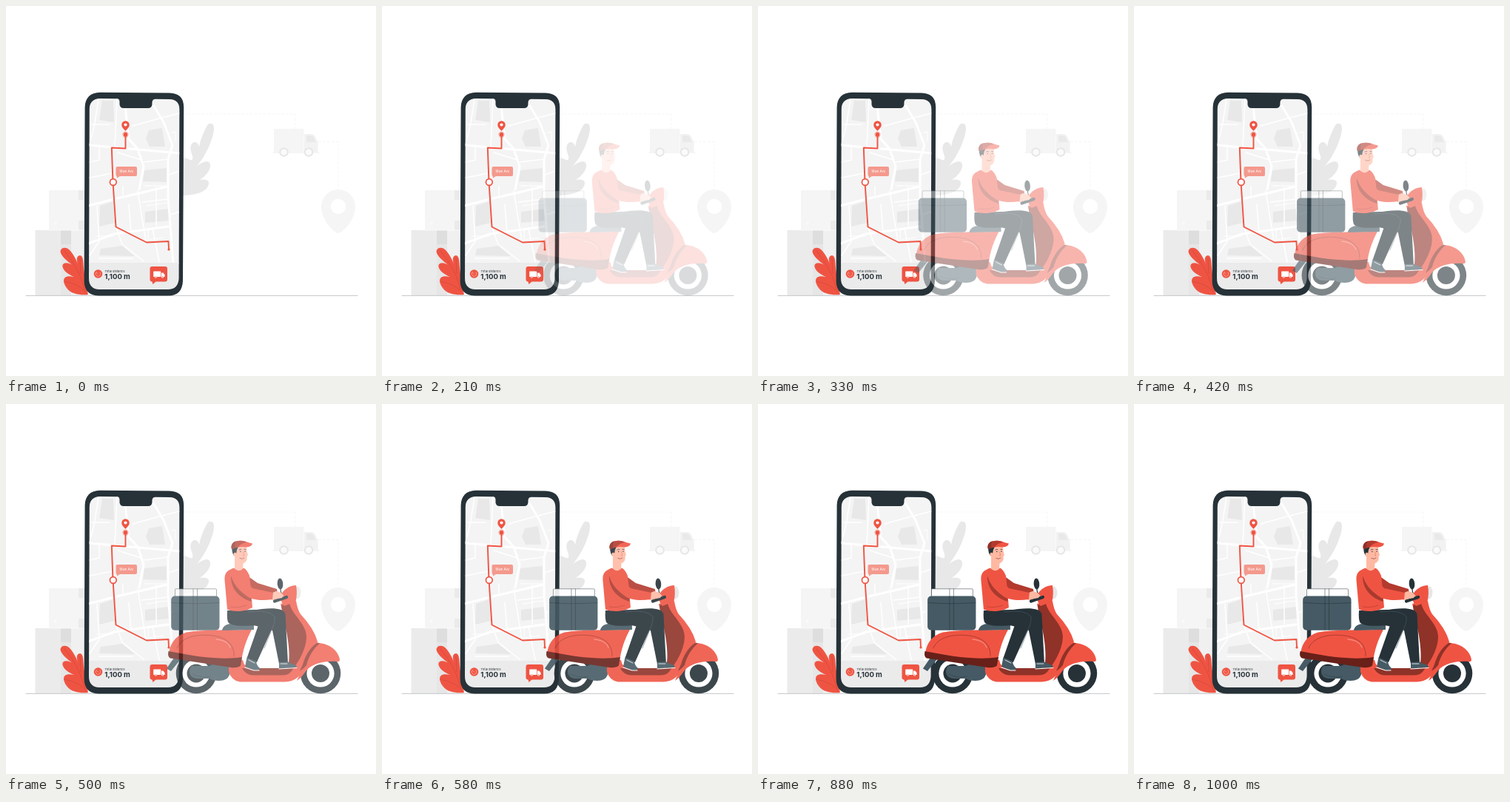
An HTML page with a canvas that plays this animation: 500 px wide and 500 px high, repeating every 1040 ms.

```html
<!DOCTYPE html>
<html lang="en">
<head>
<meta charset="utf-8">
<title>Delivery tracking</title>
<style>
html, body { margin: 0; width: 100%; height: 100%; overflow: hidden; background: #fff; }
canvas { display: block; width: 500px; height: 500px; }
</style>
</head>
<body>
<canvas id="stage"></canvas>
<script>
const SIZE = 500, LOOP = 1040, STEP = 41.6, TRAVEL = 20;
const RED = '#ef5443', DARK = '#263238', SLATE = '#455a64', MAROON = '#8f3228', SHADE = '#b23a2e', SKIN = '#ffb9a3';
const dpr = window.devicePixelRatio || 1;

function prepare(canvas) {
  canvas.width = canvas.height = SIZE * dpr;
  const c = canvas.getContext('2d');
  c.scale(dpr, dpr);
  c.lineCap = c.lineJoin = 'round';
  return c;
}
const stage = prepare(document.getElementById('stage'));
const backdrop = document.createElement('canvas');
const rider = document.createElement('canvas');
const backCtx = prepare(backdrop), rideCtx = prepare(rider);
let g = backCtx;

function fill(d, color) {
  g.fillStyle = color;
  g.fill(new Path2D(d));
}
function line(d, color, width) {
  g.strokeStyle = color;
  g.lineWidth = width;
  g.stroke(new Path2D(d));
}
function disc(x, y, r, color) {
  g.fillStyle = color;
  g.beginPath();
  g.arc(x, y, r, 0, Math.PI * 2);
  g.fill();
}
function oval(x, y, rx, ry, turn, color) {
  g.fillStyle = color;
  g.beginPath();
  g.ellipse(x, y, rx, ry, turn, 0, Math.PI * 2);
  g.fill();
}
function box(x, y, w, h, r, color) {
  g.fillStyle = color;
  g.beginPath();
  g.roundRect(x, y, w, h, r);
  g.fill();
}
function label(s, x, y, font, color) {
  g.font = font;
  g.fillStyle = color;
  g.fillText(s, x, y);
}
function pin(x, y, r, tip, hole, color) {
  const k = r * 0.75;
  fill(`M${x - r} ${y}A${r} ${r} 0 0 1 ${x + r} ${y}C${x + r} ${y + k} ${x + r * .35} ${tip - 2} ${x} ${tip}C${x - r * .35} ${tip - 2} ${x - r} ${y + k} ${x - r} ${y}Z`, color);
  disc(x, y, hole, '#fff');
}

function drawScenery() {
  // parcels
  box(58, 249, 50, 54, 0, '#f5f5f5');
  box(98, 249, 10, 13, 0, '#ebebeb');
  box(98, 290, 10, 13, 0, '#ebebeb');
  disc(67, 293.5, 2, '#fafafa');
  box(39.5, 303, 70, 88, 0, '#ebebeb');
  box(88, 303, 20, 88, 0, '#f0f0f0');
  box(74, 322, 14, 69, 0, '#e6e6e6');
  box(74, 303, 14, 19, 0, '#dedede');
  line('M58 303H106', '#fff', .6);

  // grey plant
  fill('M238 256C254 256 270 252 273 243C277 236 270 233 262 235C267 231 277 224 276 214C274 206 264 212 258 216C270 203 281 178 281 165C281 157 273 157 271 163C266 173 263 180 261 190C259 182 253 182 250 188C247 195 254 203 252 207C250 211 243 203 238 206Z', '#e8e8e8');

  // truck, pin and their dashed links
  g.setLineDash([3, 3]);
  line('M240 146H390.5V166M422 183.5H449V248', '#f3f3f3', .8);
  g.setLineDash([]);
  box(362, 166, 40.5, 31, 1, '#f5f5f5');
  fill('M403 173H413Q416 173 418 177L421.5 184V197H403Z', '#f2f2f2');
  fill('M406 175H412.5Q414.5 175 416 178L418.5 184H406Z', '#e9e9e9');
  line('M361 198H423', '#ebebeb', 1);
  for (const x of [375.5, 409]) {
    disc(x, 197.5, 6.2, '#e6e6e6');
    disc(x, 197.5, 4.3, '#fafafa');
  }
  pin(449, 271, 23, 307, 10.2, '#f5f5f5');

  line('M27 391.4H475', '#9aa1a4', .6);

  // red plant
  fill('M111 390C102 391 88 390 82 381C77 374 76 367 83 365.5C86 365 89 365.5 92 366C84 363 75 356 76.5 350C79 345 87 348 91 351C82 345 73 336 73.5 331C75 325 83 325.5 87 331C92 337 96 345 97.5 350C95 343 95 337.5 100 337C105.5 338 104 348 105.5 358L108 376Z', RED);
  line('M79 331C91 346 102 362 107 387M80 372.5C90 374 100 379 105 384M100 341L101 362', '#c24234', .5);
}

function drawMap() {
  box(111, 125, 125, 223, 0, '#f4f4f4');
  for (const d of [
    'M130 128H145L146 157L126 154Z', 'M193 168L211 165L215 190L194 190L189 179Z',
    'M187 222L217 219V238L185 237Z', 'M188 278L220 274V290L188 293Z',
    'M127 270L145 264L147 293L126 298Z', 'M128 328L157 324L174 338L126 337Z'
  ]) fill(d, '#e8e8e8');
  line('M111 188L235 199M195 127L213 157L225 188L219 207V258L226 348M111 270L150 260L218 244M111 321L146 308L219 298M160 126L166 180L178 193L186 217L180 248', '#fff', 3);
  line('M125 126L119 163L113 187M150 126L147 190M169 137L197 131M171 162L207 152L234 145M114 160L140 160M113 211L126 208V190M113 232L144 226M151 198L183 208M158 244V255M184 265L219 261M178 250L189 318M123 270L126 318L113 337M149 300L157 322L186 345M126 341H171M203 245V297M198 300L207 346M220 228L234 223M222 282L235 278M186 211L218 207M166 268L169 306', '#fff', 1.5);
  line('M224 171L229 170V184M187 243H217M190 270L217 266M192 303V316L213 313M122 311H145', '#fff', 1);
}

function drawPhone() {
  fill('M127 116.8L221 117.5C234 118 240.3 124 240.2 137L239 371C238.5 385 232 391.5 219 391.5H125C112 391 105.5 384 105.6 371L106.6 137C107 124 114 117 127 116.8Z', DARK);
  g.save();
  g.clip(new Path2D('M127 125L221 126C230 126.3 234.5 131 234.4 140L233.6 368C233 378 228 383 219 383H126C117 382.6 112 378 112 368L112.8 139C113 130 118 125.2 127 125Z'));
  drawMap();
  box(110, 347, 126, 38, 0, '#ebebeb');
  g.restore();
  fill('M150 125Q153 125 153.5 129V133Q154 138 159 138H192Q197 138 197.5 133V130Q198 126 201 126V123H150Z', DARK);

  // route
  line('M161.5 174V192.5L142.8 191.5L144.5 238L148.5 298.5L190 319.5L219.5 318L220 329', RED, 1.9);
  disc(161.5, 173.7, 4.2, 'rgba(239,84,67,.4)');
  disc(161.5, 173.7, 2.6, RED);
  pin(161.5, 160.5, 5.2, 168.8, 2.1, RED);
  disc(144.8, 238, 5.2, RED);
  disc(144.8, 238, 3.5, '#fff');
  disc(220, 329, 1.6, RED);

  box(148.5, 217, 28.5, 13, 2, '#f4998d');
  fill('M149.5 229L150 232.5L154 230Z', '#f4998d');
  label('Main Ave', 153.5, 225, '4.3px Inter, sans-serif', '#fff');

  // summary bar
  disc(124.5, 362, 5.8, RED);
  line('M122 359.5A3.4 3.4 0 1 0 127 359.6M124.5 362L122.8 360.6', '#fbd0c9', .6);
  label('Total distance', 133.5, 359.7, '4.1px Inter, sans-serif', DARK);
  label('1,100 m', 133.3, 369.3, 'bold 9.6px Inter, sans-serif', DARK);
  box(194.5, 352, 23.5, 20.5, 3, RED);
  fill('M197 371L198.5 376L203 372Z', RED);
  box(199.2, 358.5, 10, 7.5, .4, '#fff');
  fill('M209.8 360.5H212.5L214.5 363.2V366H209.8Z', '#fff');
  for (const x of [202.3, 211.5]) {
    disc(x, 366, 1.5, '#fff');
    disc(x, 366, .7, RED);
  }
}

function wheel(x, hub) {
  disc(x, 364, 27.3, DARK);
  disc(x, 364, 18.6, '#fff');
  disc(x, 364, hub, DARK);
}

function drawScooter() {
  fill('M222 357.5L234 340L241 345L228 361Z', SLATE);
  wheel(262, 12.5);
  wheel(430, 12);

  // exhaust
  fill('M256 354H280Q284 351 292 351H307V366Q304 374 293 374Q284 374 280 371H262Q253 369 253 362Q253 357 256 354Z', SLATE);
  line('M257 365Q268 371 281 368', '#37474f', .8);

  // front shield, floor and fender
  oval(398.5, 255, 5, 8.5, 0, '#e6e6e6');
  fill('M306 346H325Q327 357 337 357H386L393 340L382 294L376 270L397 266Q399 278 403 284Q421 303 426 321Q424 338 408 354Q402 375 382 375.5H321Q310 374 306 362Z', RED);
  fill('M377 272L388 269C391 285 412 297 411 316C410 334 399 350 390 362Q386 366.5 378 366.5H338Q329 366 324 357H385C391 346 386 309 379 288Z', MAROON);
  fill('M398 374C404 361 406 355 408 353C412 338 419 326 426 323C441 323 454 333 456 345Q456 349 452 348C437 347 423 350 414 357C409 361 407 368 398 374Z', RED);
  fill('M426 322.5C419 327 411 335 406 352L402 361Q408 357 411 353C414 341 421 330 429 323.3Z', MAROON);

  // rear body
  fill('M225 341C225 326 233 313 249 308.5C270 305 296 305.5 337 305C330 318 325 332 323 349L310 354L227 341Z', RED);
  fill('M224.5 334L241 337C266 342 300 346 324 342L322 353.5Q318 357 309 356L227 343.5Q223 342 224.5 334Z', '#682019');
  line('M236 330C241 317 258 311 279 312.5C302 314 314 324 313 341', '#a93a2e', .9);
  line('M289 318C300 319 306 323 308 329', '#f8a79b', .9);

  // seat and cargo
  fill('M297 306C298 299 306 296 315 297L340 299V305Z', SLATE);
  box(233.5, 249.8, 56, 12, 1, '#fff');
  line('M233.5 260V250.5Q233.5 249.8 235 249.8H288Q289.5 249.8 289.5 251V260M258 250V260M263.5 250V260', DARK, .5);
  box(228.2, 259.5, 65.3, 46.3, 5, SLATE);
  line('M229 268.5Q260 271 293 268.5M258 260V305M263.5 260V305', DARK, .55);
}

function drawLegs() {
  fill('M338 279C358 275 381 274 382.5 284L386 350L374 351L365 306L340 299Z', DARK);
  fill('M304 279L360 277.5C372 278 372 287 367 298L344 349L330.5 343.5L346 299C330 300 313 301 306 296Q303 293 304 279Z', DARK);
  line('M332 281Q359 277 368 287Q369 293 365 303L354 330', SLATE, .6);
  fill('M330.5 342.5L343 348Q344 354 348 357Q347 361 341 360L328 355Z', SLATE);
  line('M328 356L340 360H347', '#fff', 1.2);
  fill('M374 349L386 348.5Q391 351.5 397 353L398 356L374 357.5Z', SLATE);
  line('M374 358L398 356.5', '#fff', 1.2);
  line('M333 346L341 350M376 351H385', '#fff', .8);
}

function drawUpperBody() {
  // far arm, handlebar and head unit
  fill('M331 232L345 242L371 250L372 257L346 254L331 247Z', SHADE);
  fill('M376 259C380 250 389 245 397 245Q399 256 396.5 267L381 273Q376 268 376 259Z', RED);
  line('M376 250Q376 257 381 261', DARK, 1.2);
  oval(375.5, 243, 3.8, 7.5, -.08, DARK);
  fill('M360 257L370 253Q378 254 381 260L377 266L364 265Z', SKIN);
  line('M368 266.5L384 261', DARK, 4.2);
  fill('M364 256L374 257Q381 259 378 262L367 264Z', SKIN);

  // torso and near arm
  fill('M314 208H326L325 224Q321 229 314 224Z', SKIN);
  fill('M313 221.5C304 225 300 228 300.5 238L304 277.5C314 282 330 280 338 275L336 250L334 232Q331 224 326 221.5Q320 229 313 221.5Z', RED);
  fill('M309 233C309 250 320 262 336.5 267V258L318 240Z', '#a93a2e');
  fill('M309 231C315 224 324 229 328 238L338 249L366 255L365 264C351 266 338 265 331 260C320 252 312 244 309 231Z', RED);
  line('M309 274Q320 276 330 272', SHADE, .6);
}

function drawHead() {
  fill('M314 192H330L330.5 199L332 204L330.7 206Q331.5 214 325 215.5Q317 216 314 207Z', SKIN);
  fill('M310.3 193H319L317 197L316 203L314 205.5Q310 203 310.3 193Z', DARK);
  oval(314.5, 203.5, 2, 2.8, 0, SKIN);
  fill('M310 196C308 188 314 184.5 322 184.7Q329 185 332 187L338 188.5Q337 193 330 193.5Q319 192 310 196Z', RED);
  fill('M310 196C308 188 314 184.5 322 184.7Q328 185 330 187Q323 188 319 193Q314 194 310 196Z', SHADE);
  fill('M310 196C308.5 190 312 186 316 185.5Q313 190 315 194Z', MAROON);
  disc(321.8, 199.5, .7, DARK);
  disc(328, 199.3, .7, DARK);
  line('M320 197Q321.5 196 323 196.6M327 196.4L329 196.6', DARK, .7);
  line('M325.5 200L327 204.5L325 205', '#d9705d', .6);
  line('M321 208.5Q324.5 210.5 327 208', '#7a2b22', .6);
}

// progress at times in seconds; it runs a little past its end and settles
const KEYS = [[0, 0], [.042, 0], [.083, .02], [.125, .055], [.21, .17], [.333, .425], [.42, .6], [.58, .89], [.667, 1], [.75, 1.065], [.86, 1.05], [1, 1], [1.04, 1]];
function progress(t) {
  let i = 0;
  while (i < KEYS.length - 2 && t > KEYS[i + 1][0]) i++;
  const slope = k => {
    const a = KEYS[Math.max(0, k - 1)], b = KEYS[Math.min(KEYS.length - 1, k + 1)];
    return (b[1] - a[1]) / (b[0] - a[0]);
  };
  const [t0, v0] = KEYS[i], [t1, v1] = KEYS[i + 1], h = t1 - t0;
  const u = (t - t0) / h, w = 1 - u;
  return v0 * w * w * (1 + 2 * u) + v1 * u * u * (3 - 2 * u) + h * u * w * (slope(i) * w - slope(i + 1) * u);
}

drawScenery();
drawPhone();

function drawRider(shift) {
  g = rideCtx;
  g.clearRect(0, 0, SIZE, SIZE);
  g.save();
  g.translate(shift, 0);
  drawScooter();
  drawLegs();
  drawUpperBody();
  drawHead();
  g.restore();
}

let shown = -1;
function render(now) {
  const n = Math.min(24, Math.floor((now % LOOP + 5) / STEP));
  if (n === shown) return;
  shown = n;
  stage.globalAlpha = 1;
  stage.fillStyle = '#fff';
  stage.fillRect(0, 0, SIZE, SIZE);
  stage.drawImage(backdrop, 0, 0, SIZE, SIZE);
  const p = n < 2 ? 0 : progress(n / 24);
  if (p > 0) {
    drawRider((p - 1) * TRAVEL);
    stage.globalAlpha = Math.min(1, p);
    stage.drawImage(rider, 0, 0, SIZE, SIZE);
  }
}
const start = performance.now();
function tick() {
  render(performance.now() - start);
  requestAnimationFrame(tick);
}
tick();
</script>
</body>
</html>
```
